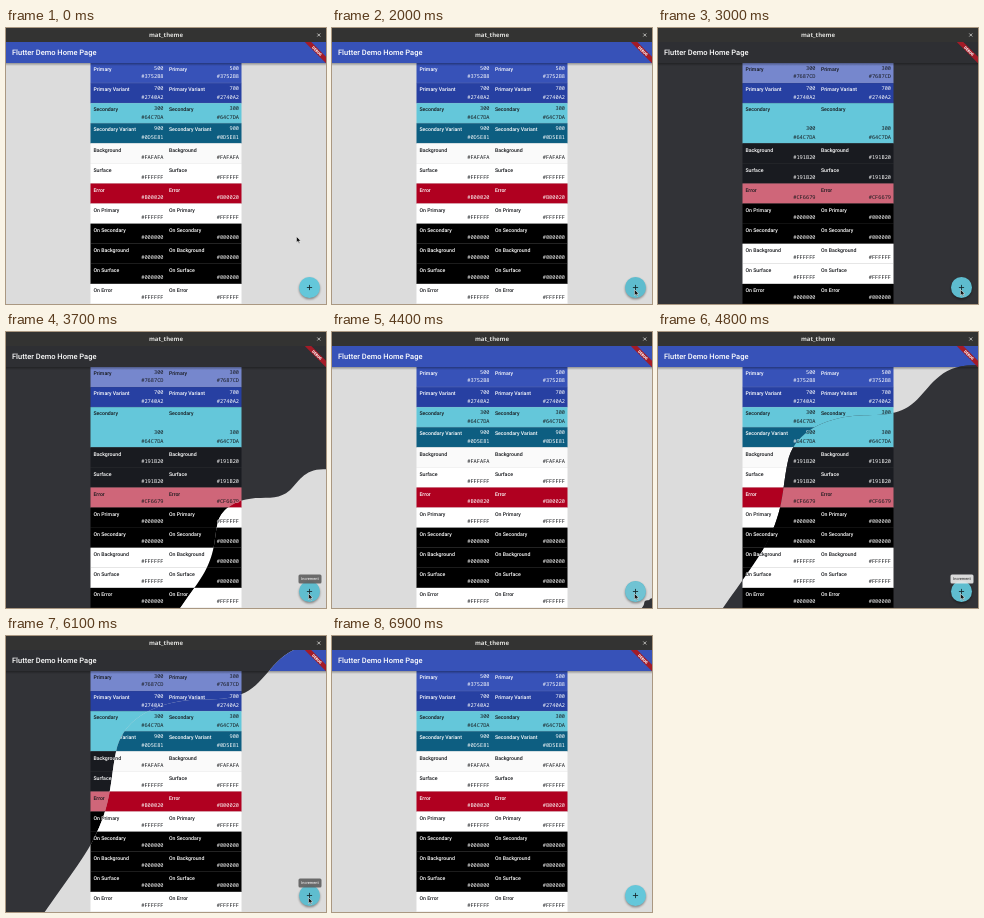
Recreate the animation shown at these times as an HTML page. Size 320x276 px, loop 7300 ms.

```html
<!DOCTYPE html>
<html lang="en">
<head>
<meta charset="utf-8">
<title>mat_theme</title>
<style>
  html, body { margin: 0; width: 100%; height: 100%; overflow: hidden; background: #333; }
  svg { display: block; width: 100vw; height: 100vh; }
  text { font-family: Roboto, sans-serif; text-rendering: geometricPrecision; }
  .label { font-size: 5.2px; font-weight: 500; }
  .code { font: 500 5.3px "Noto Sans Mono", monospace; text-anchor: end; }
</style>
</head>
<body>
<svg id="stage" viewBox="0 0 320 276">
  <defs>
    <clipPath id="reveal">
      <path id="wave" d="M0-236C-38-238-46-214-62-200S-95-188-120-187C-150-184-176-172-184-146C-191-118-187-98-206-62C-216-44-230-26-248 0L0 0Z"/>
    </clipPath>
    <linearGradient id="drop" x2="0" y2="1">
      <stop stop-color="#000" stop-opacity=".34"/>
      <stop offset="1" stop-color="#000" stop-opacity="0"/>
    </linearGradient>
    <filter id="soft" x="-50%" y="-50%" width="200%" height="200%">
      <feGaussianBlur stdDeviation="1.2"/>
    </filter>
  </defs>
  <g id="pages"></g>
  <g id="chrome">
    <rect width="320" height="14" fill="#333332"/>
    <text x="160" y="9.2" text-anchor="middle" fill="#dededb"
      style="font:600 6px 'Noto Sans',sans-serif">mat_theme</text>
    <path d="M311.3 5.5l3 3m0-3l-3 3" stroke="#d8d8d5" stroke-width=".8"/>
  </g>
  <path id="cursor" d="M0 0V6L1.5 4.7 2.5 7 3.4 6.6 2.4 4.4H4.3Z" fill="#111" stroke="#fff" stroke-width=".45"/>
</svg>
<script>
const LOOP = 7300, WAVE = 1000, MAX_SCALE = 2.05;
const WAVES = [
  { at: 2110, to: 'dark' }, { at: 3330, to: 'light' },
  { at: 4300, to: 'dark' }, { at: 5570, to: 'light' }
];
const ROW = 20.08, TOP = 35, COLUMNS = [84.5, 160], CELL = 75.5;
const NAMES = ['Primary', 'Primary Variant', 'Secondary', 'Secondary Variant', 'Background',
  'Surface', 'Error', 'On Primary', 'On Secondary', 'On Background', 'On Surface', 'On Error'];
// One "color shade" entry per row; an empty entry joins the row above.
const THEMES = {
  light: {
    page: '#dcdcdc', bar: '#3752b8', tip: '#616161', tipText: '#fff',
    rows: ['3752B8 500', '2740A2 700', '64C7DA 300', '0D5E81 900', 'FAFAFA', 'FFFFFF',
      'B00020', 'FFFFFF', '000000', '000000', '000000', 'FFFFFF']
  },
  dark: {
    page: '#323337', bar: '#2e2f33', tip: '#e9e9e9', tipText: '#222',
    rows: ['7687CD 300', '2740A2 700', '64C7DA 300', '', '191B20', '191B20',
      'CF6679', '000000', '000000', 'FFFFFF', 'FFFFFF', '000000']
  }
};
const $ = id => document.getElementById(id);

function add(parent, tag, attrs, text) {
  const node = document.createElementNS('http://www.w3.org/2000/svg', tag);
  for (const key in attrs) node.setAttribute(key, attrs[key]);
  if (text) node.textContent = text;
  parent.appendChild(node);
  return node;
}

function inkFor(hex) {
  const n = parseInt(hex, 16);
  const luma = (n >> 16) * .3 + (n >> 8 & 255) * .59 + (n & 255) * .11;
  return luma > 120 ? '#16181c' : '#fff';
}

function drawSwatch(page, x, row, rows) {
  if (!rows[row]) return;
  const [hex, shade] = rows[row].split(' ');
  const span = rows[row + 1] === '' ? 2 : 1;
  const y = TOP + row * ROW, bottom = y + span * ROW, fill = inkFor(hex);
  add(page, 'rect', { x, y, width: CELL, height: span * ROW + .1, fill: '#' + hex });
  add(page, 'rect', { x, y: bottom - .4, width: CELL, height: .4, fill: '#888', opacity: .3 });
  add(page, 'text', { class: 'label', x: x + 2.9, y: y + 8.2, fill }, NAMES[row]);
  if (shade) add(page, 'text', { class: 'code', x: x + 73, y: bottom - 13, fill }, shade);
  add(page, 'text', { class: 'code', x: x + 73, y: bottom - 4.6, fill }, '#' + hex);
}

function buildPage(theme) {
  const page = add($('pages'), 'g', {});
  add(page, 'rect', { width: 320, height: 276, fill: theme.page });
  for (const x of COLUMNS) NAMES.forEach((_, row) => drawSwatch(page, x, row, theme.rows));

  add(page, 'rect', { y: 35, width: 320, height: 3, fill: 'url(#drop)' });
  add(page, 'rect', { y: 14, width: 320, height: 21, fill: theme.bar });
  add(page, 'text', { x: 6, y: 27.2, fill: '#fff', 'font-size': 7.5, 'font-weight': 500 },
    'Flutter Demo Home Page');

  const banner = add(page, 'g', { transform: 'translate(320 14) rotate(45)' });
  add(banner, 'rect', { x: -15, y: 10.5, width: 30, height: 4.5, fill: '#a41b27' });
  add(banner, 'text', { y: 14.1, fill: '#fff', 'font-size': 3.7, 'font-weight': 900,
    'text-anchor': 'middle' }, 'DEBUG');

  add(page, 'circle', { cx: 303.5, cy: 260.8, r: 10.5, opacity: .4, filter: 'url(#soft)' });
  add(page, 'circle', { cx: 303.5, cy: 259.5, r: 10.5, fill: '#64c7da' });
  const hover = add(page, 'circle', { cx: 303.5, cy: 259.5, r: 10.5, opacity: 0 });
  const ripple = add(page, 'circle', { cx: 303.5, cy: 259.5, r: 0, fill: '#fff', opacity: 0 });
  add(page, 'path', { d: 'M300.9 259.5h5.2m-2.6-2.6v5.2', stroke: '#16292d', 'stroke-width': .85 });

  const tip = add(page, 'g', { opacity: 0 });
  add(tip, 'rect', { x: 292.5, y: 242.5, width: 23, height: 9, rx: 1.5, fill: theme.tip, opacity: .92 });
  add(tip, 'text', { x: 304, y: 248.4, fill: theme.tipText, 'font-size': 3.9,
    'text-anchor': 'middle' }, 'Increment');
  return { page, hover, ripple, tip };
}

const pages = { light: buildPage(THEMES.light), dark: buildPage(THEMES.dark) };

const clamp = v => Math.min(1, Math.max(0, v));
const progress = (t, from, length) => clamp((t - from) / length);
const mix = (a, b, p) => a + (b - a) * p;

// cubic-bezier(.42, 0, .58, 1)
function easeInOut(x) {
  let lo = 0, hi = 1;
  for (let i = 0; i < 20; i++) {
    const u = (lo + hi) / 2;
    if (1.26 * u * (1 - u) ** 2 + 1.74 * u * u * (1 - u) + u ** 3 < x) lo = u; else hi = u;
  }
  return lo * lo * (3 - 2 * lo);
}

function moveCursor(t) {
  const enter = easeInOut(progress(t, 100, 900));
  const leave = easeInOut(progress(t, 6350, 500));
  const x = mix(290.5, 302.5, enter) + 26 * leave;
  const y = mix(208.5, 261.5, enter) - 14 * leave;
  $('cursor').setAttribute('transform', `translate(${x} ${y})`);
}

let front = '';
function render(now) {
  const t = now % LOOP;
  const wave = WAVES.filter(w => t >= w.at).pop();
  const next = wave ? wave.to : 'light';
  const scale = wave ? MAX_SCALE * easeInOut(progress(t, wave.at, WAVE)) : MAX_SCALE;
  if (front !== next) {
    if (front) pages[front].page.removeAttribute('clip-path');
    $('pages').appendChild(pages[next].page);
    front = next;
  }
  if (scale < MAX_SCALE) pages[next].page.setAttribute('clip-path', 'url(#reveal)');
  else pages[next].page.removeAttribute('clip-path');
  $('wave').setAttribute('transform', `translate(320 276) scale(${scale})`);

  const press = WAVES.find(w => t >= w.at - 110 && t < w.at + WAVE);
  const since = press ? t - press.at : -1e4;
  const tip = progress(since, 250, 80) * (1 - progress(since, 800, 80));
  const grow = progress(since, -110, 220);
  const hover = .05 * progress(t, 900, 100) * (1 - progress(t, 6400, 100));
  for (const p of Object.values(pages)) {
    p.tip.setAttribute('opacity', tip);
    p.hover.setAttribute('opacity', hover);
    p.ripple.setAttribute('r', 10.5 * grow);
    p.ripple.setAttribute('opacity', press ? .15 * (1 - progress(since, 60, 200)) : 0);
  }
  moveCursor(t);
}

const start = performance.now();
function tick() {
  render(performance.now() - start);
  requestAnimationFrame(tick);
}
tick();
</script>
</body>
</html>
```
